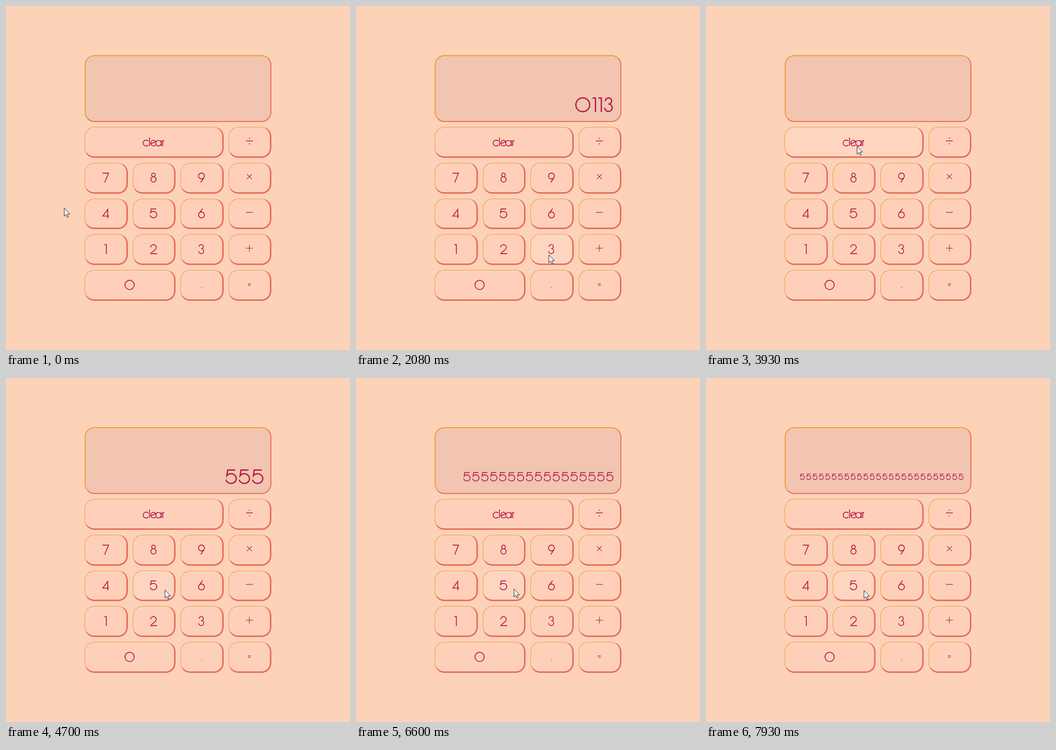
Write an HTML page that moves like this. It is 700 by 700 pixels and loops after 7.99 s.

```html
<!DOCTYPE html>
<html lang="en">
<head>
<meta charset="utf-8">
<title>Calculator</title>
<style>
  html, body { margin: 0; width: 100%; height: 100%; overflow: hidden; background: #fcd2b9; }
  #stage { position: relative; width: 700px; height: 700px; overflow: hidden; }
  .box {
    position: absolute; box-sizing: border-box; border: solid;
    border-color: #f29a38 #e86c5a #e86c5a #f29a38; border-radius: 20px;
  }
  .key {
    display: flex; align-items: center; justify-content: center;
    border-width: 1px 3px 3px 1px; color: transparent; font: 20px Lato, sans-serif;
  }
  .screen { left: 160px; top: 100px; width: 380px; height: 136px; border-width: 2px; background: #f1c5af; }
  svg { position: absolute; inset: 0; }
  .ink { fill: none; stroke: #b5124a; stroke-linejoin: miter; }
  #cursor { fill: #fff; stroke: #2b1c2b; stroke-width: 1; }
</style>
</head>
<body>
<div id="stage">
  <div class="box screen"></div>
  <svg width="700" height="700" viewBox="0 0 700 700">
    <g id="labels" class="ink"></g>
    <g id="readout" class="ink" role="img"></g>
    <path id="cursor" d="M.5 .5V16.6L4.2 13.1 6.7 18.9 9.1 17.9 6.6 12.2H11.8Z"/>
  </svg>
</div>
<script>
const LOOP = 7990;
const stage = document.getElementById('stage');
const labels = document.getElementById('labels');
const readout = document.getElementById('readout');
const cursor = document.getElementById('cursor');

// Digit outlines on a 30-unit cap height: [advance, stroke path]
const ring = (x, y, r) => `M${x - r} ${y}a${r} ${r} 0 1 1 ${2 * r} 0a${r} ${r} 0 1 1 ${-2 * r} 0`;
const digits = {
  0: [32, ring(16.5, 15, 14.1)],
  1: [9, 'M1.3 1.3H7.2V30'],
  2: [21, 'M2 9.5A8.7 8.2 0 0 1 19.4 9.5C19.4 17 8 21 2.4 28.7H22'],
  3: [20, 'M3.3 7.5A6.5 6.2 0 1 1 10 13.5H9.6H11A7.7 7.6 0 1 1 2 21'],
  4: [21, 'M17.5 30V2.6L2.5 23.2H21.5'],
  5: [24, 'M20.5 1.3H5.2L3.4 12.8A10.6 9.8 0 1 1 1.6 21'],
  6: [21, 'M14.5 .5L3.6 15' + ring(11, 19.7, 9)],
  7: [20, 'M1 1.3H19.3L7.5 30'],
  8: [21, ring(10.7, 6.8, 5.6) + ring(10.7, 20.6, 8.1)],
  9: [21, ring(11, 10, 9) + 'M18.6 15L9 29.6']
};

// Other labels, in pixels around the key's centre
const signs = {
  clear: 'M-10.7 -1.5A6 6 0 1 0 -10.7 6.5M-8.3 -9V8.5M-5.2 4.1L4.4 -.6A5.5 5.8 0 1 0 4 6.4'
    + ring(10, 2.7, 5.6) + 'M15.8 -3.2V8.5M18.6 -3.2V8.5M18.6 2C18.6 -1.5 20 -3 21.7 -2.8',
  '÷': 'M-7 -2H7M-1.2 -7.6H1.2M-1.2 4H1.2',
  '×': 'M-5 -7L5 3M5 -7L-5 3',
  '−': 'M-7 -2H7',
  '+': 'M-7 -2H7M0 -9V5',
  '.': 'M-.8 5.3H.8',
  '=': 'M-3 -2.3H3M-3 .7H3'
};

const rows = [
  [['clear', 3], ['÷', 1]],
  [['7', 1], ['8', 1], ['9', 1], ['×', 1]],
  [['4', 1], ['5', 1], ['6', 1], ['−', 1]],
  [['1', 1], ['2', 1], ['3', 1], ['+', 1]],
  [['0', 2], ['.', 1], ['=', 1]]
];

function addPath(parent, d, transform, width) {
  const p = document.createElementNS('http://www.w3.org/2000/svg', 'path');
  p.setAttribute('d', d);
  p.setAttribute('transform', transform);
  p.setAttribute('stroke-width', width);
  parent.append(p);
  return p;
}

const keys = [];
rows.forEach((row, r) => {
  let col = 0;
  for (const [name, span] of row) {
    const x = 160 + col * 97.5, y = 246 + r * 72.8, w = span * 97.5 - 10, h = 62.8;
    const el = document.createElement('div');
    el.className = 'box key';
    el.textContent = name;
    el.style.cssText = `left:${x}px;top:${y}px;width:${w}px;height:${h}px`;
    stage.insertBefore(el, stage.lastElementChild);
    const cx = x + w / 2 - 1, cy = y + h / 2 - 1;
    if (digits[name]) {
      const [adv, d] = digits[name], s = 2 / 3;
      addPath(labels, d, `translate(${cx - (adv + 1) * s / 2} ${cy - 10}) scale(${s})`, 2.5);
    } else {
      const p = addPath(labels, signs[name], `translate(${cx} ${cy})`, name === 'clear' ? 1.6 : 1.2);
      if (name === '÷') p.setAttribute('stroke-width', 1.5);
      if (name === '+' || name === '=') p.style.stroke = '#b13a24';
    }
    keys.push({ name, x, y, w, h, el });
    col += span;
  }
});

// Pointer: [time, x, y]
const path = [
  [0, 118, 411], [230, 118, 411], [450, 195, 510], [690, 248, 558], [930, 248, 558],
  [1240, 198, 503], [1640, 198, 503], [1800, 300, 513], [1980, 392, 506], [2150, 392, 506],
  [2410, 226, 426], [2640, 226, 426], [2920, 232, 413], [3180, 278, 330], [3430, 305, 270],
  [3900, 305, 270], [4240, 323, 431], [4800, 323, 431], [5300, 321, 429], [6800, 321, 429],
  [7300, 321, 432], [LOOP, 321, 432]
];

function pointer(t) {
  if (t <= 0) return [118, 411];
  const i = path.findIndex(p => p[0] > t);
  const [t0, x0, y0] = path[i - 1], [t1, x1, y1] = path[i];
  const k = (t - t0) / (t1 - t0);
  return [x0 + (x1 - x0) * k, y0 + (y1 - y0) * k];
}

// Clicks: the first entries by hand, then a steady run on 5
const clicks = [[830, '0'], [1330, '1'], [1530, '1'], [2050, '3'], [2480, '4'], [3730, 'clear']];
const run = [[4390, 1], [5960, 12], [6590, 17], [6930, 19], [7660, 24], [7920, 26]];
for (let i = 0; i < run.length - 1; i++) {
  const [t0, n0] = run[i], [t1, n1] = run[i + 1];
  for (let n = n0; n < n1; n++) clicks.push([t0 + (t1 - t0) * (n - n0) / (n1 - n0), '5']);
}
clicks.push([7920, '5']);

const textAt = t => clicks.reduce((s, [at, k]) => at > t ? s : k === 'clear' ? '' : s + k, '');

let shown = '';
function showText(text) {
  if (text === shown) return;
  shown = text;
  readout.replaceChildren();
  readout.setAttribute('aria-label', text);
  const s = Math.min(1, 258 / 24 / text.length);
  let x = 527;
  for (const ch of [...text].reverse()) {
    const [adv, d] = digits[ch];
    x -= adv * s + 3;
    addPath(readout, d, `translate(${x} ${201 - 15 * s}) scale(${s})`, Math.max(2.5, 1.25 / s));
  }
}

const inside = (k, [x, y]) => x >= k.x && x < k.x + k.w && y >= k.y && y < k.y + k.h;

function draw(t) {
  const [x, y] = pointer(t);
  cursor.setAttribute('transform', `translate(${Math.round(x)} ${Math.round(y)})`);
  showText(textAt(t));
  const trail = Array.from({ length: 6 }, (_, i) => pointer(t - i * 30));
  const click = clicks.find(([at]) => t >= at - 50 && t < at + 10);
  for (const k of keys) {
    const glow = trail.filter(p => inside(k, p)).length / trail.length;
    const mix = (a, b) => Math.round(a + (b - a) * glow);
    k.el.style.background = `rgb(254,${mix(208, 214)},${mix(185, 192)})`;
    k.el.style.opacity = click && click[1] === k.name ? 0.85 : 1;
  }
}

const start = performance.now();
function tick() {
  draw((performance.now() - start) % LOOP);
  requestAnimationFrame(tick);
}
tick();
</script>
</body>
</html>
```
